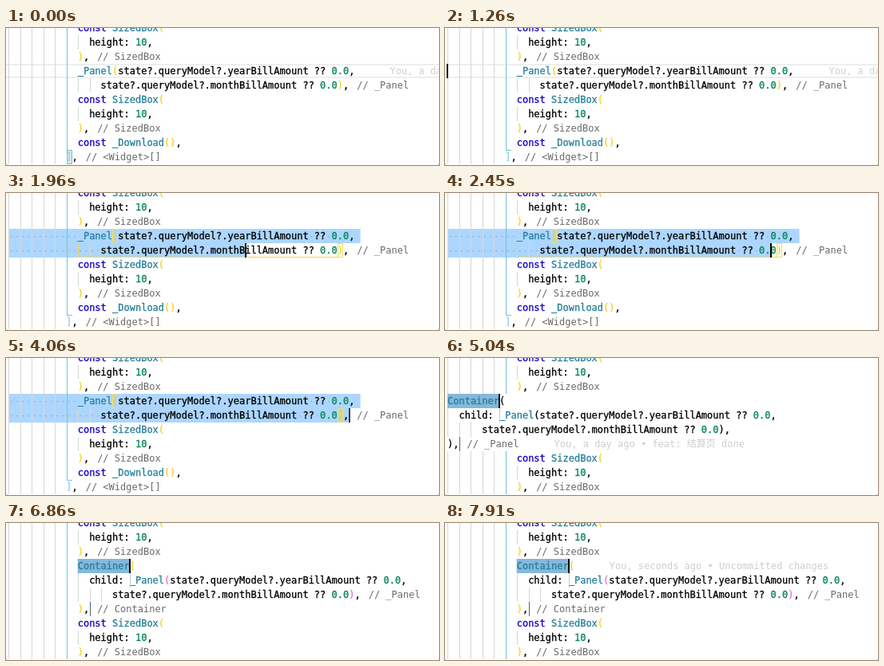
An HTML page with a canvas that plays this animation: 542 px wide and 172 px high, repeating every 8000 ms.

```html
<!DOCTYPE html>
<html lang="en">
<head>
<meta charset="utf-8">
<title>Wrapping a widget in a container</title>
<style>
  html, body { margin: 0; width: 100%; height: 100%; overflow: hidden; background: #c6cfda; }
  canvas { display: block; background: #fff; border-radius: 0 0 3px 3px; }
</style>
</head>
<body>
<canvas id="stage" width="542" height="172"></canvas>
<script>
const ctx = document.getElementById('stage').getContext('2d');
const LOOP = 8000, CHAR = 7.224, LEFT = 3, ROW = 18;
const GOLD = '#f5cf1b', ORCHID = '#da70d6', SKY = '#87cefa', SCOPE = '#74bfd8', BLACK = '#000';

const colX = col => LEFT + col * CHAR;
const edgeX = col => Math.ceil(colX(col) - .1);
const rowY = row => row * ROW - 9;

function rect(x, y, w, h, color) {
  ctx.fillStyle = color;
  ctx.fillRect(x, y, w, h);
}

function text(str, x, row, color) {
  ctx.fillStyle = color;
  ctx.fillText(str, x, row * ROW + 4);
}

// Code is set slightly heavier than labels
function codeText(str, col, row, color) {
  text(str, colX(col), row, color);
  ctx.strokeStyle = color;
  ctx.lineWidth = .3;
  ctx.strokeText(str, colX(col), row * ROW + 4);
}

function tokenColor(token, paren) {
  if (token === 'const') return '#1400c4';
  if (/^_?[A-Z]/.test(token)) return '#267f99';
  if (/^\d/.test(token)) return '#098658';
  if (/[()]/.test(token)) return paren;
  return token === ']' ? SKY : BLACK;
}

// A line of code: indent, source, closing label and bracket color
function drawLine(row, { indent, code, label, paren = GOLD }) {
  for (let col = 0; col < indent; col += 2) {
    rect(edgeX(col), rowY(row), 1, ROW, col === 10 ? SCOPE : '#d6d6d6');
  }
  let col = indent;
  for (const [token] of code.matchAll(/\w+(\.\d)?|\W/g)) {
    codeText(token, col, row, tokenColor(token, paren));
    col += token.length;
  }
  if (label) text('// ' + label, colX(col) + 10, row, '#6a6a6a');
}

const line = (indent, code, label, paren) => ({ indent, code, label, paren });
const sizedBox = [
  line(12, 'const SizedBox('),
  line(14, 'height: 10,'),
  line(12, '),', 'SizedBox'),
];
const yearCall = '_Panel(state?.queryModel?.yearBillAmount ?? 0.0,';
const monthArg = 'state?.queryModel?.monthBillAmount ?? 0.0),';

const before = [
  ...sizedBox,
  line(12, yearCall),
  line(16, monthArg, '_Panel'),
  ...sizedBox,
  line(12, 'const _Download(),'),
  line(10, '],', '<Widget>[]'),
];

const wrapped = (indent, outer, inner, labelled) => [
  ...sizedBox,
  line(indent, 'Container(', '', outer),
  line(indent + 2, 'child: ' + yearCall, '', inner),
  line(indent + 6, monthArg, labelled && '_Panel', inner),
  line(indent, '),', labelled ? 'Container' : '_Panel', outer),
  ...sizedBox,
];

function box(col, row, color) {
  ctx.strokeStyle = color;
  ctx.lineWidth = 1;
  ctx.strokeRect(edgeX(col) + .5, rowY(row) + .5, 6, ROW - 1);
}

function parenBoxes() {
  box(18, 3, '#f3dc66');
  box(57, 4, '#f3dc66');
}

function parenGuide() {
  rect(90, rowY(4), 1, ROW, '#ecd65a');
  rect(90, rowY(5) - 1, 325, 1, '#ecd65a');
}

const BLINKS = [[3010, 3500], [4060, 4550], [5460, 5950], [6510, 6720], [7280, 7910]];

function drawCursor(t, col, row) {
  const off = BLINKS.find(([from, to]) => t >= from && t < to);
  ctx.globalAlpha = !off ? 1 : t < off[0] + 70 ? .75 : 0;
  rect(Math.round(colX(col) - .6), rowY(row), 2, ROW, BLACK);
  ctx.globalAlpha = 1;
}

// Column reached by the dragged selection, updated every 70 ms
const DRAG = [[1400, 12], [1470, 14], [2170, 52], [2240, 53], [2450, 56], [2590, 59]];

function dragColumn(t) {
  const now = Math.floor(t / 70) * 70;
  const next = DRAG.findIndex(([time]) => time > now);
  if (next < 0) return 59;
  const [t0, c0] = DRAG[next - 1], [t1, c1] = DRAG[next];
  return Math.round(c0 + (c1 - c0) * (now - t0) / (t1 - t0));
}

function whitespaceDots(row, indent, code, end) {
  const full = ' '.repeat(indent) + code;
  for (let col = 0; col < Math.min(end, full.length); col++) {
    if (full[col] === ' ') rect(colX(col) + 3, row * ROW, 1.3, 1.3, '#7faac8');
  }
}

function drawSelecting(t) {
  const dragging = t >= 1400;
  const inParens = (t >= 140 && t < 1260) || (t >= 1540 && t < 2590);
  const col = dragging ? dragColumn(t) : 0;
  if (dragging) {
    rect(LEFT, rowY(3), colX(61) - LEFT, ROW, '#add6ff');
    rect(LEFT, rowY(4), colX(col) - LEFT, ROW, '#add6ff');
  } else {
    rect(0, rowY(3), 542, 2, '#eee');
    rect(0, rowY(4) - 2, 542, 2, '#eee');
  }
  if (t < 140) rect(edgeX(10), rowY(9), 7, ROW, '#dde6e6');
  before.forEach((item, row) => drawLine(row, item));
  if (dragging) {
    whitespaceDots(3, 12, yearCall, 61);
    whitespaceDots(4, 16, monthArg, col);
  }
  if (t < 1610) text('You, a day ago', 480.5, 3, '#d0d0d0');

  if (t < 140) box(10, 9, SCOPE);
  else rect(edgeX(10), rowY(9), 7, 1, SCOPE);
  if (inParens || dragging) parenBoxes();
  if (inParens) parenGuide();
  if (t >= 1260) drawCursor(t, col, dragging ? 4 : 3);
}

function drawWrapped(t) {
  const indent = t < 6720 ? 0 : 12;
  const [outer, inner] = t < 5110 ? [BLACK, BLACK] : [GOLD, ORCHID];
  rect(colX(indent), rowY(3), 9 * CHAR, ROW, '#85b8dc');
  wrapped(indent, outer, inner, t >= 5180).forEach((item, row) => drawLine(row, item));
  rect(edgeX(indent + 9), rowY(4), 1, ROW, '#c2cbd2');
  rect(edgeX(indent + 2), rowY(6), 1, ROW, '#59636b');
  if (t < 5180) text('You, a day ago • feat: 结算页 done', 136.6, 6, '#cecece');
  if (t >= 7490) text('You, seconds ago • Uncommitted changes', 205.7, 3, '#cecece');
  drawCursor(t, indent + 9, 3);
}

function frame() {
  const t = performance.now() % LOOP;
  ctx.clearRect(0, 0, 542, 172);
  ctx.font = '12px "DejaVu Sans Mono", "Noto Sans CJK SC", "Noto Sans CJK", monospace';
  if (t < 4970) drawSelecting(t);
  else drawWrapped(t);
  requestAnimationFrame(frame);
}
frame();
</script>
</body>
</html>
```
